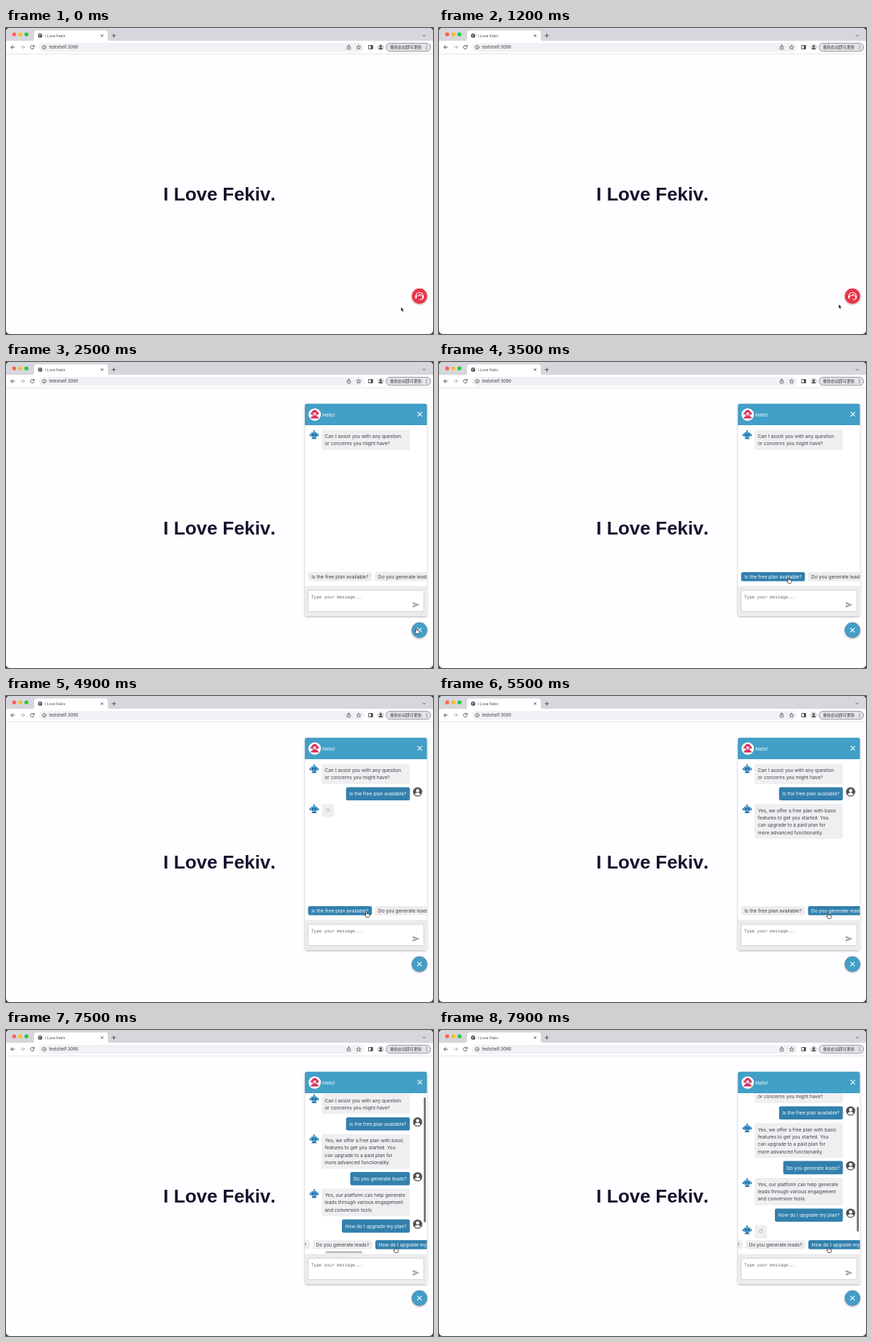
These frames come from a looping animation (600x431 px, 8 s). An HTML page:

```html
<!DOCTYPE html>
<html lang="en">
<head>
<meta charset="utf-8">
<title>Chat widget</title>
<style>
  html, body { margin: 0; width: 100%; height: 100%; overflow: hidden; background: #30343a; }
  svg { display: block; width: 600px; height: 431px; }
  text { font: 6.7px Inter, sans-serif; fill: #3d3d42; white-space: pre; }
  .white { fill: #fff; }
  .mid { text-anchor: middle; }
  .line { fill: none; stroke: #44474c; stroke-width: .9; stroke-linecap: round; stroke-linejoin: round; }
  .line.pale { stroke: #fff; stroke-width: 1.1; }
  .title { font: bold 26.3px "Liberation Sans", Arial, sans-serif; font-kerning: none; fill: #15132d; }
  .mono { font: 6px "DejaVu Sans Mono", monospace; fill: #666; }
</style>
</head>
<body>
<svg viewBox="0 0 600 431">
  <defs>
    <clipPath id="windowClip"><rect width="600" height="431" rx="5"/></clipPath>
    <clipPath id="logClip"><rect x="420" y="89" width="171.5" height="206"/></clipPath>
    <clipPath id="chipClip"><rect x="420" y="294" width="171.5" height="21"/></clipPath>
    <filter id="shadow" x="-10%" y="-10%" width="120%" height="120%">
      <feDropShadow dx="0" dy="1" stdDeviation="1.6" flood-opacity=".3"/>
    </filter>
    <g id="robot">
      <path d="M0-5V-3M-5.6-1V2M5.6-1V2" stroke="#2c6ea3" stroke-width="1.5"/>
      <circle cy="-5.4" r="1.1" fill="#4a79c4"/>
      <rect x="-4.8" y="-3.4" width="9.6" height="6.8" rx="2.8" fill="#3b9ad0"/>
      <path d="M-3.6 6Q-3 3.4 0 3.4T3.6 6Z" fill="#2c6ea3"/>
      <circle cx="-2" r="1" fill="#25384f"/><circle cx="2" r="1" fill="#25384f"/>
    </g>
    <g id="person">
      <circle r="6.5" fill="#505256"/>
      <circle cy="-1.7" r="2.3" fill="#fff"/>
      <path d="M-3.9 3.9Q-3.5 1.2 0 1.2T3.9 3.9Q0 6.6-3.9 3.9Z" fill="#fff"/>
    </g>
  </defs>

  <g clip-path="url(#windowClip)">
    <rect width="600" height="431" fill="#fefdff"/>
    <rect width="600" height="18" fill="#d6d7dd"/>
    <circle cx="11.5" cy="9" r="2.8" fill="#fe5f57"/>
    <circle cx="20" cy="9" r="2.8" fill="#febc2e"/>
    <circle cx="28.7" cy="9" r="2.8" fill="#28c840"/>
    <path d="M37 18Q39.5 18 39.5 15V7Q39.5 3.5 43 3.5H139.5Q143 3.5 143 7V15Q143 18 145.5 18Z" fill="#fff"/>
    <circle cx="48" cy="10.8" r="3" fill="#44474c"/>
    <path d="M46 9.5L48 10.3L47.4 12.5M48.5 8.6L50 10.5" stroke="#fff" stroke-width=".8" fill="none"/>
    <text x="55" y="12.7" style="font-size:5.1px">I Love Fekiv</text>
    <path class="line" d="M133.6 9.4L136.4 12.2M136.4 9.4L133.6 12.2M149 10.8H154M151.5 8.3V13.3M585.8 9.9L587.5 11.6L589.2 9.9"/>

    <rect y="18" width="600" height="18" fill="#fff"/>
    <rect y="36" width="600" height=".7" fill="#dcdde0"/>
    <path class="line" d="M12 27H7M9.3 24.6L7 27L9.3 29.4M39.2 25.6A2.6 2.6 0 1 0 39.5 27.8M39.6 24.2V26H37.8"/>
    <path class="line" d="M21 27H26M23.7 24.6L26 27L23.7 29.4" style="stroke:#a9abb0"/>
    <rect x="46.5" y="21" width="456.5" height="12.4" rx="6.2" fill="#f0f1f4"/>
    <circle class="line" cx="53.6" cy="27.1" r="2.6" style="stroke-width:.7"/>
    <path class="line" d="M53.6 27V28.4M53.6 25.6V25.7" style="stroke-width:.7"/>
    <text x="60.5" y="29.2" style="font-size:6px">testshelf:3090</text>
    <path class="line" style="stroke-width:.7" d="M480.3 26H479.3V29.8H483.9V26H482.9M481.6 28V23.8M480.4 25L481.6 23.8L482.8 25M495.5 24.2L496.4 26.2L498.5 26.4L496.9 27.8L497.4 29.9L495.5 28.8L493.6 29.9L494.1 27.8L492.5 26.4L494.6 26.2Z"/>
    <rect class="line" x="509.8" y="24.5" width="5.4" height="5"/>
    <rect x="512.6" y="24.5" width="2.6" height="5" fill="#44474c"/>
    <circle cx="526.5" cy="27" r="4.7" fill="#d5d7dc"/>
    <circle cx="526.5" cy="25.7" r="1.5" fill="#3c3f45"/>
    <path d="M523.6 29.7Q524 27.7 526.5 27.7T529.4 29.7Z" fill="#3c3f45"/>
    <rect x="534" y="21.4" width="62.6" height="11.4" rx="5.7" fill="#e3e4e8" stroke="#6c6f75" stroke-width=".7"/>
    <text x="539.4" y="29.1" style="font:5.6px 'Noto Sans CJK SC','Noto Sans CJK',sans-serif">重新启动即可更新</text>
    <path class="line" d="M591 24.8V24.9M591 27V27.1M591 29.2V29.3" style="stroke-width:1.2"/>

    <text class="title mid" x="300" y="243">I Love Fekiv.</text>

    <g id="panel">
      <rect x="420" y="58.7" width="171.5" height="299.3" rx="3" fill="#fff" filter="url(#shadow)"/>
      <path d="M420 89V61.7Q420 58.7 423 58.7H588.5Q591.5 58.7 591.5 61.7V89Z" fill="#429fc7"/>
      <circle cx="433.8" cy="74" r="8.7" fill="#fff"/>
      <circle cx="433.8" cy="72" r="4.4" fill="#d5305c"/>
      <path d="M428 79.5Q429 75.8 433.8 75.8T439.6 79.5Z" fill="#d5305c"/>
      <circle cx="433.8" cy="73.2" r="2.4" fill="#f4c9ce"/>
      <path d="M428.8 71V74M438.8 71V74" stroke="#d5305c" stroke-width="1.4"/>
      <text class="white" x="444.5" y="76.6">Hello!</text>
      <path class="line pale" d="M578.7 70.7L584.3 76.3M584.3 70.7L578.7 76.3"/>
      <g clip-path="url(#logClip)"><g id="log"></g></g>
      <rect id="vbar" x="587" y="108" width="3" height="176" rx="1.5" fill="#77797d"/>
      <g clip-path="url(#chipClip)"><g id="chips"></g>
        <rect id="hbar" y="311.5" width="52" height="3" rx="1.5" fill="#77797d"/>
      </g>
      <path d="M420 315.5H591.5V355Q591.5 358 588.5 358H423Q420 358 420 355Z" fill="#ececef"/>
      <rect x="424.5" y="321.5" width="162.5" height="30" rx="1.5" fill="#fff" stroke="#cbccd0" stroke-width=".8"/>
      <text class="mono" x="429" y="333">Type your message...</text>
      <path d="M571.6 338L581 342L571.6 346V343L577 342L571.6 341Z" fill="#a0a2a6"/>
    </g>

    <g filter="url(#shadow)">
      <circle cx="581" cy="377.6" r="10.8" fill="#e8394b"/>
      <circle id="blue" cx="581" cy="377.6" r="10.8" fill="#429fc7"/>
    </g>
    <g id="headset" class="line pale">
      <path d="M576 379.5V377.5A5 5 0 0 1 586 377.5V379.5M586 380Q585.5 382.6 582 382.6M577.8 377.6Q581 377.4 582 375Q583 377 584.2 377.4"/>
      <path d="M576 377.6V380M586 377.6V380" stroke-width="2"/>
    </g>
    <path id="cross" class="line pale" d="M578.2 374.8L583.8 380.4M583.8 374.8L578.2 380.4"/>

    <g id="cursor" stroke-linejoin="round">
      <path id="arrow" d="M0 0V6.2L1.4 5L2.4 7.2L3.4 6.7L2.5 4.6H4.4Z" fill="#111" stroke="#fff" stroke-width=".5"/>
      <path id="hand" d="M-.8.8Q0-.6.8.8V3Q2 2.3 2.4 3.2Q3.4 2.8 3.6 3.8Q4.6 3.6 4.5 4.8Q4.4 6.8 3.4 8H-.4Q-1.6 6.2-2.5 4.8Q-2.2 3.6-.8 5Z" fill="#fff" stroke="#111" stroke-width=".7"/>
    </g>
  </g>
</svg>

<script>
const LOOP = 8000, OPEN = 1900;
const $ = id => document.getElementById(id);
const show = (el, on) => el.style.display = on ? '' : 'none';
const clamp = v => Math.max(0, Math.min(1, v));
const progress = (t, from, to) => clamp((t - from) / (to - from));
const smooth = p => p * p * (3 - 2 * p);

// Value of [time, value...] keys at time t, eased between keys
function track(keys, t) {
  const next = keys.findIndex(k => k[0] > t);
  if (next < 0) return keys.at(-1).slice(1);
  if (!next) return keys[0].slice(1);
  const a = keys[next - 1], b = keys[next];
  const p = smooth(progress(t, a[0], b[0]));
  return a.slice(1).map((v, i) => v + (b[i + 1] - v) * p);
}

const box = (x, y, w, h, fill) =>
  `<rect x="${x}" y="${y}" width="${w}" height="${h}" rx="2.5" fill="${fill}"/>`;

function botMessage(y, lines) {
  return `<use href="#robot" x="433" y="${y + 7}"/>` +
    box(443.5, y, 124, 8 + lines.length * 10.3, '#efeff2') +
    lines.map((s, i) => `<text x="448" y="${y + 11.6 + i * 10.35}">${s}</text>`).join('');
}

const userMessage = (y, w, s) => box(567.5 - w, y, w, 18.6, '#3280ad') +
  `<text class="white mid" x="${567.5 - w / 2}" y="${y + 11.9}">${s}</text>
   <use href="#person" x="578.4" y="${y + 6.6}"/>`;

const loader = y => `<use href="#robot" x="433" y="${y + 7}"/>` +
  box(443.5, y, 17.5, 18.8, '#efeff2') +
  `<circle class="spin" cx="452.3" cy="${y + 8.6}" r="2.1" fill="none" stroke="#85878c"
    stroke-width="1.5" stroke-dasharray=".6 1.049"/>`;

const questions = [
  { text: 'Is the free plan available?', x: 424.5, w: 89.7 },
  { text: 'Do you generate leads?', x: 518.5, w: 83.8 },
  { text: 'How do I upgrade my plan?', x: 606.5, w: 95.5 }
];
const [q1, q2, q3] = questions;

// Each entry: markup, time shown, time hidden
const entries = [
  [botMessage(95.5, ['Can I assist you with any question', 'or concerns you might have?']), 0, LOOP],
  [userMessage(128.5, q1.w, q1.text), 4200, LOOP],
  [loader(152), 4500, 5200],
  [botMessage(152, ['Yes, we offer a free plan with basic', 'features to get you started. You',
    'can upgrade to a paid plan for', 'more advanced functionality.']), 5200, LOOP],
  [userMessage(205.6, q2.w, q2.text), 5700, LOOP],
  [loader(229), 5900, 6400],
  [botMessage(229, ['Yes, our platform can help generate', 'leads through various engagement',
    'and conversion tools.']), 6400, LOOP],
  [userMessage(272.4, q3.w, q3.text), 7400, LOOP],
  [loader(295.5), 7600, LOOP]
];
$('log').innerHTML = entries.map(e => `<g>${e[0]}</g>`).join('');
$('chips').innerHTML = questions.map(q => box(q.x, 296, q.w, 12.8, '') +
  `<text class="mid" x="${q.x + q.w / 2}" y="304.8">${q.text}</text>`).join('');
const groups = [...$('log').children];
const spinners = document.querySelectorAll('.spin');
const chipBoxes = $('chips').querySelectorAll('rect');
const chipTexts = $('chips').querySelectorAll('text');

const cursorPath = [
  [1000, 555, 393], [1600, 580.5, 378], [2400, 580.5, 378], [3200, 491, 303.7],
  [3600, 491, 303.7], [4100, 506.5, 303.7], [4950, 506.5, 303.7], [5400, 547, 305.5]
];
const chipScroll = [[6500, 0], [6700, 40], [7000, 87.5]];
const logScroll = [[7400, 0], [7700, 21]];

function draw(t) {
  const [x, y] = track(cursorPath, t);
  const [scroll] = track(chipScroll, t);
  const [rise] = track(logScroll, t);
  const opened = progress(t, OPEN, OPEN + 300);

  show($('panel'), t >= OPEN);
  $('panel').setAttribute('transform', `translate(${187 * (1 - opened) ** 2})`);
  $('blue').setAttribute('opacity', opened ** 2);
  show($('headset'), t < OPEN);
  show($('cross'), t >= OPEN);

  groups.forEach((g, i) => show(g, t >= entries[i][1] && t < entries[i][2]));
  $('log').setAttribute('transform', `translate(0 ${-rise})`);
  $('vbar').setAttribute('opacity', progress(t, 7400, 7500));
  $('vbar').setAttribute('y', 90 + rise * 18 / 21);
  spinners.forEach(s => s.setAttribute('stroke-dashoffset', -t / 100 * .41));

  $('chips').setAttribute('transform', `translate(${-scroll})`);
  $('hbar').setAttribute('x', 422 + scroll * .305);
  $('hbar').setAttribute('opacity', progress(t, 6500, 6600) * (1 - progress(t, 7400, 7600)));

  let pointing = Math.hypot(x - 581, y - 377.6) < 10.8;
  questions.forEach((q, i) => {
    const left = q.x - scroll;
    const hover = t > OPEN && y > 296 && y < 308.8 && x > left && x < left + q.w;
    pointing ||= hover;
    chipBoxes[i].setAttribute('fill', hover ? '#3280ad' : '#ededf0');
    chipTexts[i].style.fill = hover ? '#fff' : '';
  });
  $('cursor').setAttribute('transform', `translate(${x} ${y})`);
  show($('hand'), pointing);
  show($('arrow'), !pointing);
}

function frame() {
  draw(performance.now() % LOOP);
  requestAnimationFrame(frame);
}
frame();
</script>
</body>
</html>
```
